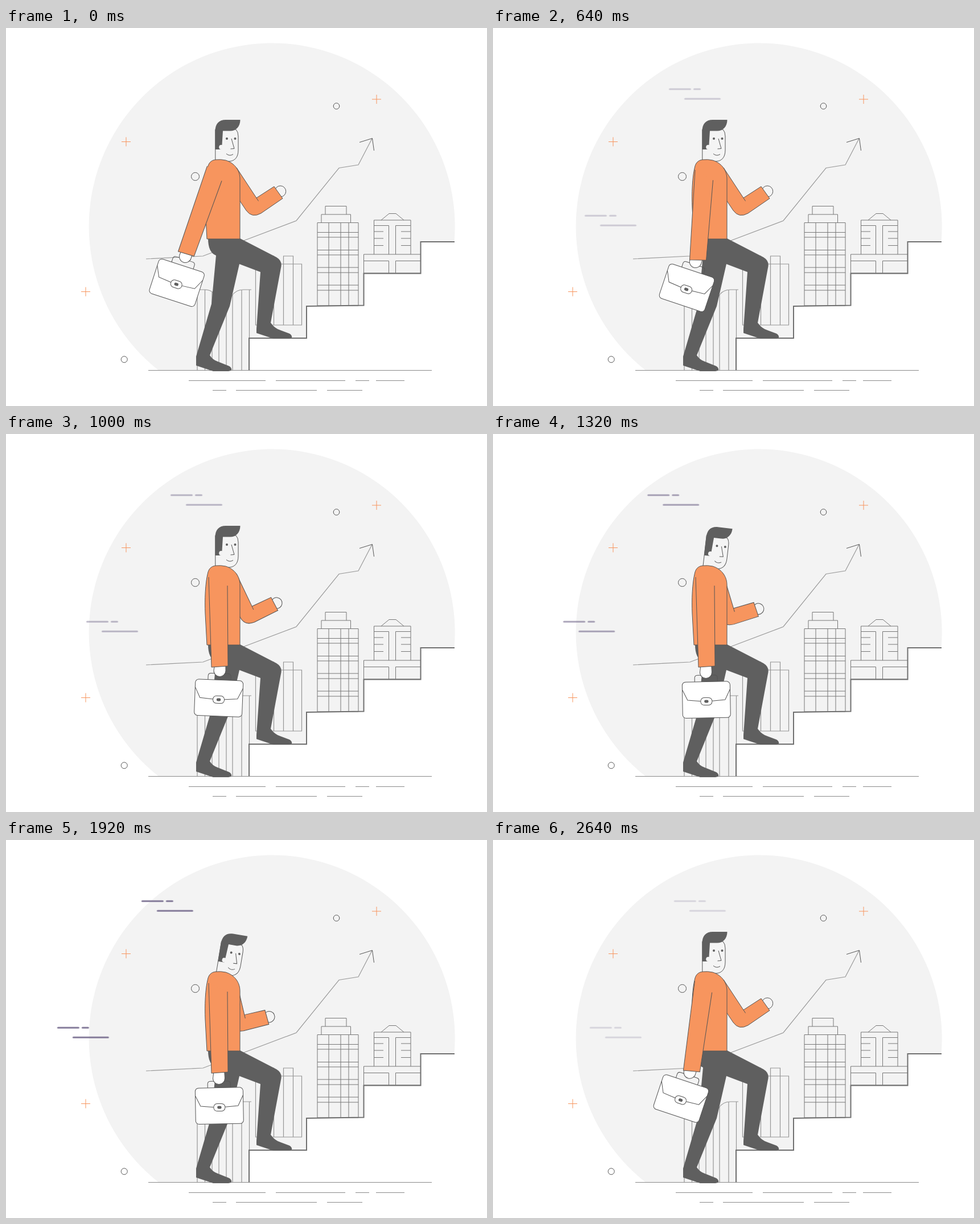
An HTML page for the animation above (2680 ms loop, 845 px wide and 663 px high).

```html
<!DOCTYPE html>
<html lang="en">
<head>
<meta charset="utf-8">
<title>Climbing the stairs</title>
<style>
  html, body { margin: 0; height: 100%; overflow: hidden; background: #fff; }
  svg { display: block; width: 100vw; height: 100vh; }
  .line { fill: none; stroke: #555; }
  .skin { fill: #f4f4f4; stroke: #555; }
  .white { fill: #fff; stroke: #555; }
  .shirt { fill: #f7955e; }
  .edge { stroke: #555; }
  .dark { fill: #5f5f5f; }
</style>
</head>
<body>
<svg viewBox="0 0 845 663">
  <path fill="#f3f3f3" d="M267.5 600A321.5 321.5 0 1 1 787.5 375H728V430H628V487L528 488V544H427V600Z"/>

  <!-- chart -->
  <path class="line" stroke-width="1.2" style="stroke:#999" d="M246 405L346 400L510 338L585 245.5L619 240L643 194"/>
  <path class="line" d="M621 200.5L643.5 193.5L646.5 215"/>

  <!-- buildings -->
  <g class="line" stroke-width="1.2" style="stroke:#959595">
    <path d="M336 459H349Q358 459 364 464M397 470Q403 459 417 459H431
      M336 459V600M349.5 459V600M362 463V600M374 470V600M387 470V600M398 468V600M414 459V600M427.5 459V600"/>
    <path d="M438.500 414H519.500V521H438.500ZM454 414V400H470.500V521M454 414V521M487.500 521V400H504.500V521"/>
  </g>
  <g class="line" style="stroke:#777">
    <path d="M547 341.500H619V487H547ZM554 341.500V327H605.500V341.500M561 327V312.500H598V327
      M567 341V487M588 341V487M602 341V487
      M547 358.500H619M547 367H619M547 389.500H619M547 398H619M547 420H619M547 429H619M547 451H619M547 460H619"/>
    <path d="M646.500 397V337H711V397M659 337L673 325.500H685L699 337M628.500 397H728.500V430H628.500Z
      M628 408.500H672.500V430M728 408.500H684.500V430M647 346.500H672.500V397M711 346.500H684.500V397
      M647 357H663M647 369H663M647 381.500H663M694 357H711M694 369H711M694 381.500H711"/>
  </g>

  <!-- stairs and ground -->
  <path class="line" stroke-width="2" style="stroke:#707070" d="M427 600V544H528V488L628.500 486.500V430.500H728.500V375H788"/>
  <path class="line" style="stroke:#8a8a8a" d="M250 600.500H748M321 618.500H456M474 618.500H596M614 618.500H638M650 618.500H700M363 635.500H387M404 635.500H546M564 635.500H626"/>

  <!-- ornaments -->
  <path class="line" style="stroke:#f7955e" d="M643 125H659M651 117V133M203 199.500H219M211 191.500V207.500M132 462.500H148M140 454.500V470.500"/>
  <g class="line">
    <circle cx="580.5" cy="137" r="5.3"/>
    <circle cx="332.5" cy="260.5" r="7"/>
    <circle cx="207.700" cy="581.300" r="5.5"/>
  </g>
  <g id="dashes" fill="none" stroke="#786e90" stroke-width="3" stroke-linecap="round">
    <path id="dash" d="M346 107.300H382M389 107.300H399M373 124.300H434"/>
    <use href="#dash" x="-148" y="222"/>
  </g>

  <!-- man -->
  <path class="dark" d="M355 369H411L475 402Q485 408 483.500 418L465 517Q472 527 482 530L498 536Q503 539 502 543Q500 545 495 545H470
    L440 535V528L447 428L410 414L393 488L358 574Q363 582 372 585L392 593Q397 596 396 600Q394 602 388 602H364L334 592V576L361 484L369 399Q355 394 355 369Z"/>
  <g id="frontArm">
    <circle class="skin" cx="482" cy="286.5" r="9.7"/>
    <path class="shirt" d="M405 245L440 298L471 278L486 299L448 325Q432 334 422 320L390 272Z"/>
    <path class="line" d="M405 245L443.500 303.500M440 298L471 278L486 299L448 325Q432 334 422 320L390 272"/>
  </g>
  <g id="head">
    <path class="skin" d="M367.800 238V178H404Q408 182 408 190V214C408 228 401 234 390 234L386 238"/>
    <path class="dark" d="M367.500 213V181C367.500 168 374 161 386 161H411.500C411.500 173 404 180.500 394 180.500H381L379 213Z"/>
    <circle cx="378.200" cy="209" r="4" fill="#f4f4f4"/>
    <circle class="dark" cx="388" cy="194" r="2"/>
    <circle class="dark" cx="402.5" cy="194" r="2"/>
    <path class="line" d="M396 194L401 211.500L394.500 212M387 220.500Q392.500 225.500 399 221.500"/>
  </g>
  <path class="shirt edge" d="M368 231C360 232 356 237 354.500 244C350 262 349 290 350 315L353 370H411V265C411 250 402 237 386 232Q378 230 368 231Z"/>
  <g id="bag">
    <path class="line" d="M-20 17V10Q-20 5 -15 5H15Q20 5 20 10V17"/>
    <path class="white" d="M-9 -11L-10.500 0A10.500 10.500 0 0 0 10.500 0L10 -11Z"/>
    <rect class="white" x="-42" y="16.5" width="84" height="63.5" rx="6"/>
    <path class="line" d="M-42 30L-33 48.500L-10 50.500H10L33 48.500L42 30"/>
    <rect class="white" x="-10" y="44.500" width="20" height="13" rx="6"/>
    <rect class="dark" x="-3.700" y="48.500" width="7.400" height="5" rx="2.2"/>
  </g>
  <g id="backArm">
    <path class="shirt" d="M356 251L361 409L390 407L389 266Z"/>
    <path class="line" d="M356 251L361 409L390 407L389 266"/>
  </g>
</svg>
<script>
  const LOOP = 2680, CYCLE = 2160, STEP = 40;
  // time, hand x, hand y, tilt of hand and bag
  const BAG_KEYS = [
    [0, 315, 401, 18],
    [840, 368.5, 412.8, 18.6],
    [1000, 375.5, 415, 2.2],
    [1120, 374.5, 418, -6],
    [1300, 374, 418, -1]
  ];
  const part = id => document.getElementById(id);
  const ramp = (t, from, to) => Math.min(1, Math.max(0, (t - from) / (to - from)));
  const place = (id, transform) => part(id).setAttribute('transform', transform);

  function bagPose(t) {
    const next = Math.max(1, BAG_KEYS.findIndex(key => key[0] > t));
    const i = t >= BAG_KEYS.at(-1)[0] ? BAG_KEYS.length - 1 : next;
    const a = BAG_KEYS[i - 1], b = BAG_KEYS[i], k = ramp(t, a[0], b[0]);
    return a.map((v, n) => v + (b[n] - v) * k);
  }

  function draw(now) {
    const t = Math.floor(now % LOOP / STEP) * STEP % CYCLE;
    const [, x, y, tilt] = bagPose(t);
    place('bag', `translate(${x} ${y}) rotate(${tilt})`);
    place('backArm', `rotate(${20.6 * (1 - ramp(t, 0, 860))} 378.5 239.5)`);
    place('frontArm', `rotate(${20 * ramp(t, 720, 1440)} 405 242.5)`);
    place('head', `rotate(${9.5 * ramp(t, 1040, 1440)} 371 242)`);
    place('dashes', `translate(${-120 * t / CYCLE} 0)`);
    part('dashes').setAttribute('opacity', t / CYCLE);
  }

  const start = performance.now();
  function tick() {
    draw(performance.now() - start);
    requestAnimationFrame(tick);
  }
  tick();
</script>
</body>
</html>
```
